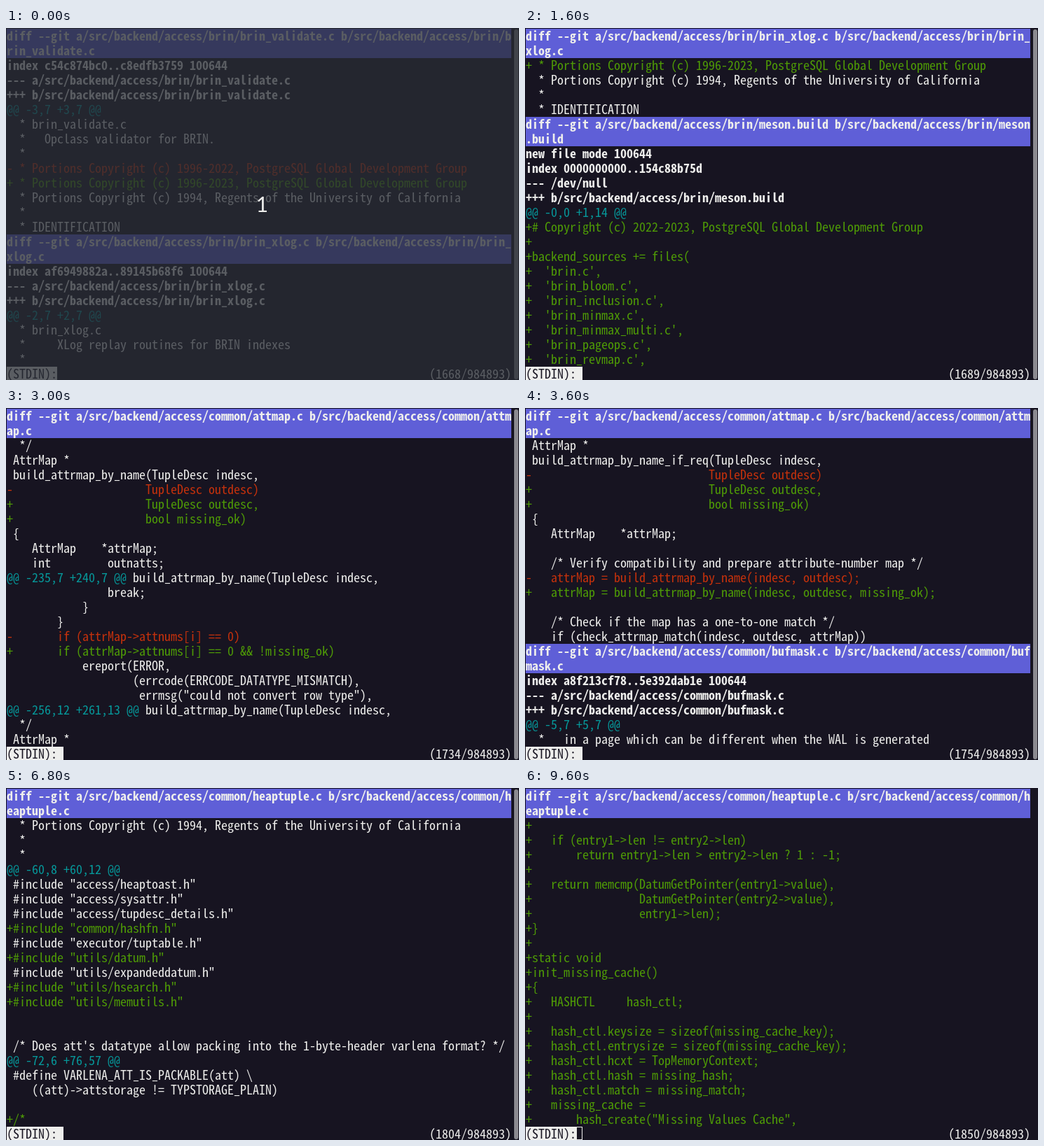
These frames come from a looping animation (732x503 px, 9700 ms). An HTML page with a canvas:

```html
<!DOCTYPE html>
<html lang="en">
<head>
<meta charset="utf-8">
<title>Paging through a diff</title>
<style>
  html, body { margin: 0; width: 100%; height: 100%; overflow: hidden; background: #171421; }
  canvas { display: block; width: 732px; height: 503px; }
</style>
</head>
<body>
<canvas id="stage" width="732" height="503"></canvas>
<script>
const LOOP = 9700, TICK = 100;
const COLS = 80, ROWS = 23, CELL_W = 9, CELL_H = 21, PAD = 1, BASE = 17;
const FIRST = 1668, TOTAL = 984893;
const COLOR = {
  bg: '#171421', fg: '#eeeeec', section: '#5f5fd7', bar: '#8b8a90',
  add: '#4e9a06', del: '#c4310c', hunk: '#06989a', veil: 'rgba(40,44,52,0.75)'
};

const lines = [];

function addFile(path, index, body, isNew) {
  const meta = text => lines.push({ text, bold: true });
  lines.push({ text: `diff --git a/${path} b/${path}`, bold: true, section: true });
  if (isNew) meta('new file mode 100644');
  meta(`index ${index}${isNew ? '' : ' 100644'}`);
  meta(isNew ? '--- /dev/null' : `--- a/${path}`);
  meta(`+++ b/${path}`);
  for (const text of body.replace(/^\n|\n$/g, '').split('\n')) lines.push({ text });
}

const GROUP = 'PostgreSQL Global Development Group';
const bump = (from, label = 'Portions Copyright') =>
  `- * ${label} (c) ${from}-2022, ${GROUP}\n+ * ${label} (c) ${from}-2023, ${GROUP}`;
const REGENTS = '  * Portions Copyright (c) 1994, Regents of the University of California';
const BRIN = 'src/backend/access/brin/', COMMON = 'src/backend/access/common/';

addFile(BRIN + 'brin_validate.c', 'c54c874bc0..c8edfb3759', `
@@ -3,7 +3,7 @@
  * brin_validate.c
  *   Opclass validator for BRIN.
  *
${bump(1996)}
${REGENTS}
  *
  * IDENTIFICATION
`);

addFile(BRIN + 'brin_xlog.c', 'af6949882a..89145b68f6', `
@@ -2,7 +2,7 @@
  * brin_xlog.c
  *     XLog replay routines for BRIN indexes
  *
${bump(1996)}
${REGENTS}
  *
  * IDENTIFICATION
`);

const parts = ['', '_bloom', '_inclusion', '_minmax', '_minmax_multi', '_pageops',
  '_revmap', '_tuple', '_validate', '_xlog'];
addFile(BRIN + 'meson.build', '0000000000..154c88b75d', `
@@ -0,0 +1,14 @@
+# Copyright (c) 2022-2023, ${GROUP}
+
+backend_sources += files(
${parts.map(p => `+  'brin${p}.c',`).join('\n')}
+)
`, true);

addFile(COMMON + 'attmap.c', '896f82a22b..eec39aa7f7', `
@@ -10,7 +10,7 @@
  * columns in a different order, taking into account dropped columns.
  * They are also used by the tuple conversion routines in tupconvert.c.
  *
${bump(1996)}
${REGENTS}
  *
  *
@@ -169,10 +169,15 @@ build_attrmap_by_position(TupleDesc indesc,
  * and output columns by name.  (Dropped columns are ignored in both input and
  * output.)  This is normally a subroutine for convert_tuples_by_name in
  * tupconvert.c, but can be used standalone.
+ *
+ * If 'missing_ok' is true, a column from 'outdesc' not being present in
+ * 'indesc' is not flagged as an error; AttrMap.attnums[] entry for such an
+ * outdesc column will be 0 in that case.
  */
 AttrMap *
 build_attrmap_by_name(TupleDesc indesc,
-                     TupleDesc outdesc)
+                     TupleDesc outdesc,
+                     bool missing_ok)
 {
    AttrMap    *attrMap;
    int         outnatts;
@@ -235,7 +240,7 @@ build_attrmap_by_name(TupleDesc indesc,
                break;
            }
        }
-       if (attrMap->attnums[i] == 0)
+       if (attrMap->attnums[i] == 0 && !missing_ok)
            ereport(ERROR,
                    (errcode(ERRCODE_DATATYPE_MISMATCH),
                     errmsg("could not convert row type"),
@@ -256,12 +261,13 @@ build_attrmap_by_name(TupleDesc indesc,
  */
 AttrMap *
 build_attrmap_by_name_if_req(TupleDesc indesc,
-                            TupleDesc outdesc)
+                            TupleDesc outdesc,
+                            bool missing_ok)
 {
    AttrMap    *attrMap;

    /* Verify compatibility and prepare attribute-number map */
-   attrMap = build_attrmap_by_name(indesc, outdesc);
+   attrMap = build_attrmap_by_name(indesc, outdesc, missing_ok);

    /* Check if the map has a one-to-one match */
    if (check_attrmap_match(indesc, outdesc, attrMap))
`);

addFile(COMMON + 'bufmask.c', 'a8f213cf78..5e392dab1e', `
@@ -5,7 +5,7 @@
  *   in a page which can be different when the WAL is generated
  *   and when the WAL is applied.
  *
${bump(2016)}
  *
  * Contains common routines required for masking a page.
  *
`);

addFile(COMMON + 'detoast.c', '92c9c658d3..108e0126a1', `
@@ -3,7 +3,7 @@
  * detoast.c
  *   Retrieve compressed or external variable size attributes.
  *
${bump(2000, 'Copyright')}
  *
  * IDENTIFICATION
  *   src/backend/access/common/detoast.c
`);

addFile(COMMON + 'heaptuple.c', '503cda46ef..ef246c901e', `
@@ -45,7 +45,7 @@
  * and we'd like to still refer to them via C struct offsets.
  *
  *
${bump(1996)}
${REGENTS}
  *
  *
@@ -60,8 +60,12 @@
 #include "access/heaptoast.h"
 #include "access/sysattr.h"
 #include "access/tupdesc_details.h"
+#include "common/hashfn.h"
 #include "executor/tuptable.h"
+#include "utils/datum.h"
 #include "utils/expandeddatum.h"
+#include "utils/hsearch.h"
+#include "utils/memutils.h"
 
 
 /* Does att's datatype allow packing into the 1-byte-header varlena format? */
@@ -72,6 +76,57 @@
 #define VARLENA_ATT_IS_PACKABLE(att) \\
    ((att)->attstorage != TYPSTORAGE_PLAIN)
 
+/*
+ * Setup for caching pass-by-ref missing attributes in a way that survives
+ * tupleDesc destruction.
+ */
+
+typedef struct
+{
+   int         len;
+   Datum       value;
+} missing_cache_key;
+
+static HTAB *missing_cache = NULL;
+
+static uint32
+missing_hash(const void *key, Size keysize)
+{
+   const missing_cache_key *entry = (missing_cache_key *) key;
+
+   return hash_bytes((const unsigned char *) entry->value, entry->len);
+}
+
+static int
+missing_match(const void *key1, const void *key2, Size keysize)
+{
+   const missing_cache_key *entry1 = (missing_cache_key *) key1;
+   const missing_cache_key *entry2 = (missing_cache_key *) key2;
+
+   if (entry1->len != entry2->len)
+       return entry1->len > entry2->len ? 1 : -1;
+
+   return memcmp(DatumGetPointer(entry1->value),
+                 DatumGetPointer(entry2->value),
+                 entry1->len);
+}
+
+static void
+init_missing_cache()
+{
+   HASHCTL     hash_ctl;
+
+   hash_ctl.keysize = sizeof(missing_cache_key);
+   hash_ctl.entrysize = sizeof(missing_cache_key);
+   hash_ctl.hcxt = TopMemoryContext;
+   hash_ctl.hash = missing_hash;
+   hash_ctl.match = missing_match;
+   missing_cache =
+       hash_create("Missing Values Cache",
`);

// [time, top line, glide]: glide means the key is held until the next entry.
const scroll = [
  [0, 1668], [500, 1669],
  [1000, 1670, true], [1600, 1689, true], [2400, 1714, true], [3600, 1754, true], [3900, 1764],
  [4400, 1769], [5300, 1782], [5700, 1795], [6100, 1796],
  [6600, 1797, true], [7800, 1837, true], [8200, 1850]
];

function topLine(t) {
  const i = scroll.findLastIndex(key => key[0] <= t);
  const [t0, n0, glide] = scroll[i];
  if (!glide) return n0;
  const [t1, n1] = scroll[i + 1];
  return Math.round(n0 + (n1 - n0) * (t - t0) / (t1 - t0));
}

function cursorState(t) {
  if (t >= 9400) return 'hollow';
  const off = t < 500 || (t >= 4900 && t < 5200) || t >= 8800;
  return off ? 'off' : 'block';
}

const ctx = document.getElementById('stage').getContext('2d', { alpha: false });
const FAMILY = '"Noto Sans Mono CJK JP", "Noto Sans Mono CJK SC", "Noto Sans Mono", monospace';
ctx.font = `100px ${FAMILY}`;
const fontSize = CELL_W * 100 / ctx.measureText('0').width;

const colX = col => PAD + col * CELL_W;
const rowY = row => PAD + row * CELL_H;

function print(text, col, row, color, bold) {
  ctx.font = `${bold ? 700 : 400} ${fontSize}px ${FAMILY}`;
  ctx.fillStyle = color;
  ctx.fillText(text, colX(col), rowY(row) + BASE);
}

function fillCells(col, row, count, color) {
  ctx.fillStyle = color;
  ctx.fillRect(colX(col), rowY(row), count * CELL_W, CELL_H);
}

function bodyColor({ text, bold }) {
  if (bold) return COLOR.fg;
  return { '+': COLOR.add, '-': COLOR.del }[text[0]] || COLOR.fg;
}

// Draws one wrapped line and returns the row below it.
function drawLine(line, row) {
  const { text, bold, section } = line;
  const height = Math.max(1, Math.ceil(text.length / COLS));
  for (let i = 0; i < height && row + i < ROWS; i++) {
    if (section) fillCells(0, row + i, COLS, COLOR.section);
    print(text.slice(i * COLS, (i + 1) * COLS), 0, row + i, bodyColor(line), bold);
  }
  const hunk = text.match(/^@@.*? @@/);
  if (hunk) {
    fillCells(0, row, hunk[0].length, COLOR.bg);
    print(hunk[0], 0, row, COLOR.hunk);
  }
  return row + height;
}

function drawStatus(number, cursor) {
  const label = '(STDIN):', position = `(${number}/${TOTAL})`;
  fillCells(0, ROWS, label.length, COLOR.fg);
  print(label, 0, ROWS, COLOR.bg);
  print(position, COLS - position.length, ROWS, COLOR.fg);
  if (cursor === 'block') fillCells(label.length, ROWS, 1, COLOR.fg);
  if (cursor === 'hollow') {
    ctx.strokeStyle = COLOR.fg;
    ctx.lineWidth = 1;
    ctx.strokeRect(colX(label.length) + 0.5, rowY(ROWS) + 0.5, CELL_W - 1, 18);
  }
}

function drawScrollbar(alpha) {
  ctx.globalAlpha = alpha;
  ctx.fillStyle = COLOR.bar;
  ctx.beginPath();
  ctx.roundRect(725, 2, 6, 500, 3);
  ctx.fill();
  ctx.globalAlpha = 1;
}

function drawCountdown() {
  ctx.fillStyle = COLOR.veil;
  ctx.fillRect(0, 0, 732, 503);
  ctx.font = '30px Lato, sans-serif';
  ctx.fillStyle = '#eeeeec';
  ctx.textAlign = 'center';
  ctx.fillText('1', 365.5, 263);
  ctx.textAlign = 'left';
}

function draw(t) {
  ctx.fillStyle = COLOR.bg;
  ctx.fillRect(0, 0, 732, 503);

  const number = topLine(t), top = number - FIRST;
  const header = lines.findLast((line, i) => i <= top && line.section);
  let row = drawLine(header, 0);
  for (let i = top + 1; row < ROWS && i < lines.length; i++) row = drawLine(lines[i], row);

  drawStatus(number, cursorState(t));
  drawScrollbar(t < 9400 ? 1 : Math.max(0, (9600 - t) / 300));
  if (t < 100) drawCountdown();
}

const start = performance.now();
let shown = -1;
function tick() {
  const t = Math.floor((performance.now() - start) % LOOP / TICK) * TICK;
  if (t !== shown) draw(shown = t);
  requestAnimationFrame(tick);
}
tick();
</script>
</body>
</html>
```
